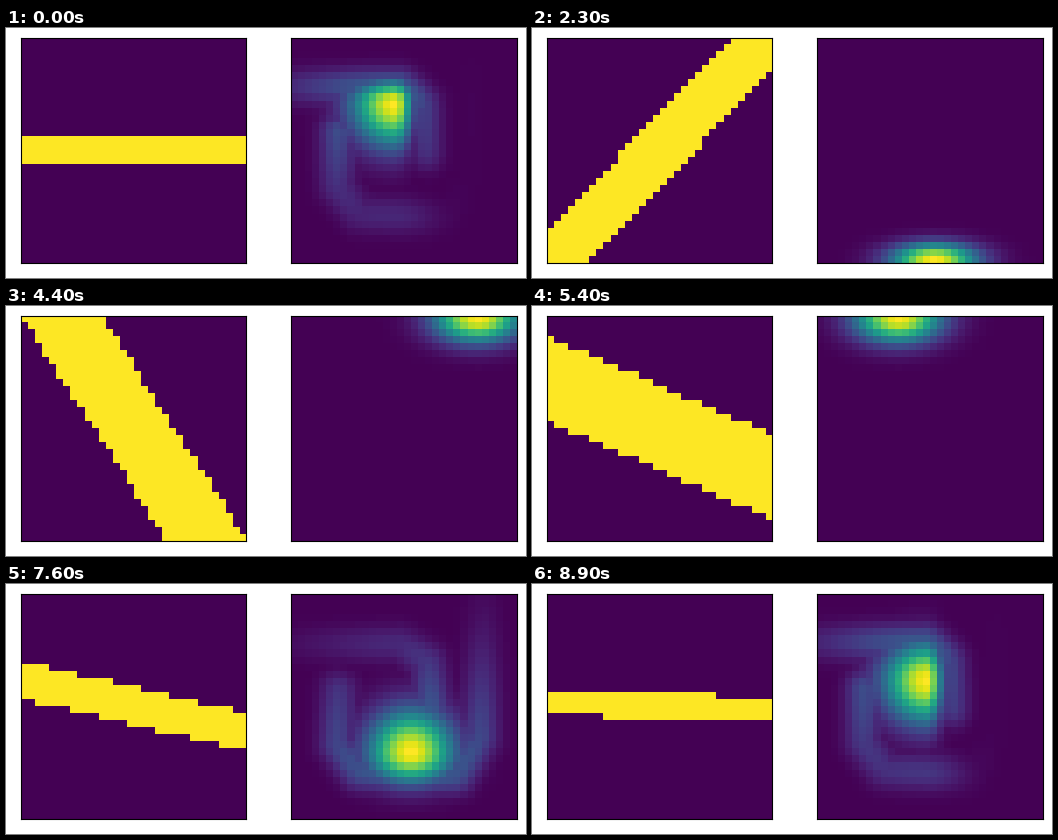
Recreate the animation shown at these times as a matplotlib script. Size 520 px wide and 250 px high, loop 9 s.

```python
import numpy as np
import matplotlib.pyplot as plt
from matplotlib.animation import FuncAnimation

W, H, DPI = 520, 250, 100
N = 32
FRAMES, STEP = 90, 100
ENTER, LEAVE = 9, 54  # the bump circles the rim between these times

cols, rows = np.meshgrid(np.arange(N), np.arange(N))
mid = (N - 1) / 2

# Bar: time, angle in degrees, half thickness in cells
BAR = np.transpose([(0, 0, 1.7), (9, 14, 2.555), (23, 46.1, 3.63),
                    (34, 71.4, 2.8), (50, 154, 5.95), (54, 156.5, 5.5),
                    (76, 166.8, 2.63), (90, 179.4, 1.64)])

# Way of the bump through the inner room: time, x, y
INNER = np.transpose([(54, 11, 0), (66, 25.5, 10), (76, 16.5, 22.2),
                      (89, 15, 11.8), (90, 14.2, 8.8), (99, 0, 13.3)])

# Borders between rim and room
LEFT, RIGHT, TOP, BOTTOM = 5.5, 28, 4.7, 27.8


def ridge(*lines, width=1.8):
    """Soft band around a set of polylines."""
    band = np.zeros((N, N))
    for line in lines:
        for (x0, y0), (x1, y1) in zip(line, line[1:]):
            dx, dy = x1 - x0, y1 - y0
            s = ((cols - x0) * dx + (rows - y0) * dy) / (dx * dx + dy * dy)
            s = np.clip(s, 0, 1)
            d2 = (cols - x0 - s * dx) ** 2 + (rows - y0 - s * dy) ** 2
            band = np.maximum(band, np.exp(-d2 / (2 * width ** 2)))
    return band


RIDGE = ridge([(0, 6.3), (15, 6.3), (19, 9), (19.5, 16)],
              [(6, 13), (5.8, 21), (9, 25), (23, 25.5), (26.5, 20), (27, 0)])


def bar(t):
    angle = np.radians(np.interp(t, BAR[0], BAR[1]))
    half = np.interp(t, BAR[0], BAR[2])
    dist = (cols - mid) * np.sin(angle) - (mid - rows) * np.cos(angle)
    return (np.abs(dist) <= half).astype(float)


def position(t):
    if ENTER <= t < LEAVE:
        a = np.radians(min(7 * (t - 9.9), 283))
        ring = mid + 20 * np.array([-np.cos(a), np.sin(a)])
        return np.clip(ring, 0, N - 1)
    t = t if t >= LEAVE else t + FRAMES
    return [np.interp(t, INNER[0], v) for v in INNER[1:]]


def spread(p, walls):
    """Widths below and above p: half the way to the next wall."""
    below = min((p - w for w in walls if w < p), default=N)
    above = min((w - p for w in walls if w >= p), default=N)
    return np.clip([below / 2, above / 2], 1.5, 4.2)


def bump(t):
    x, y = position(t)
    fold = 17.5 + .8 * max(0, y - 12)
    l, r = spread(x, (LEFT, fold, RIGHT) if TOP < y < BOTTOM else ())
    u, d = spread(y, (TOP, BOTTOM))
    dx, dy = cols - x, rows - y
    sx, sy = np.where(dx < 0, l, r), np.where(dy < 0, u, d)
    core = np.exp(-((dx / sx) ** 2 + (dy / sy) ** 2) / 2)
    depth = min(x - LEFT, RIGHT - x, y - TOP, BOTTOM - y)
    tail = .33 * np.clip(depth / 3, 0, 1) * RIDGE * core ** .15
    out = np.maximum(core, tail)
    return out / out.max()


def panel(fig, x, data):
    ax = fig.add_axes([x / W, 1 - 235.4 / H, 225.2 / W, 225.1 / H])
    ax.set(xticks=[], yticks=[])
    return ax.imshow(data, cmap="viridis", vmin=0, vmax=1,
                     interpolation="nearest", aspect="auto")


fig = plt.figure(figsize=(W / DPI, H / DPI), dpi=DPI, facecolor="white")
stimulus = panel(fig, 15.2, bar(0))
response = panel(fig, 285.4, bump(0))


def update(t):
    stimulus.set_data(bar(t))
    response.set_data(bump(t))
    return stimulus, response


anim = FuncAnimation(fig, update, frames=FRAMES, interval=STEP,
                     repeat=True, repeat_delay=0)
plt.show()
```
